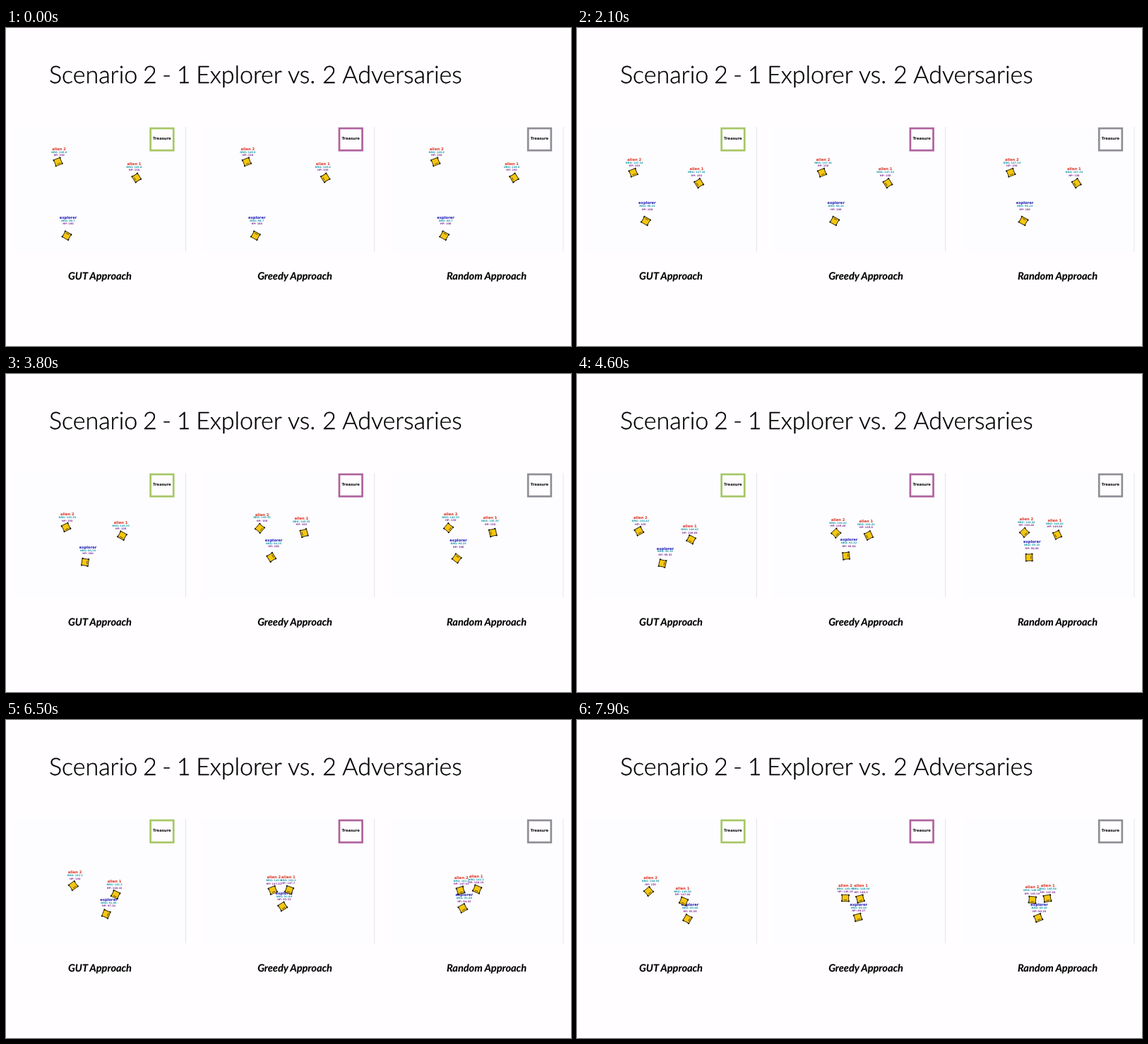
Recreate the animation shown at these times as an HTML page. Size 800 by 450 pixels, loop 8000 ms.

```html
<!DOCTYPE html>
<html lang="en">
<head>
<meta charset="utf-8">
<title>Scenario 2</title>
<style>
  html, body { margin: 0; width: 100%; height: 100%; overflow: hidden; background: #fffdff; }
  svg { display: block; width: 800px; height: 450px; }
  text { text-rendering: geometricPrecision; }
  .title { font: 300 34px Lato, Carlito, sans-serif; word-spacing: 0.5px; fill: #000; stroke: #000; stroke-width: 0.35px; }
  .tight { word-spacing: -1.5px; }
  .caption { font: italic 700 14.5px Lato, Carlito, sans-serif; text-anchor: middle; fill: #000; stroke: #000; stroke-width: 0.15px; }
  .tag, .treasure { font: 700 5.2px "DejaVu Sans", sans-serif; text-anchor: middle; }
  .alien { fill: #dc2c1c; }
  .explorer { fill: #1818b4; }
  .stat { font-size: 3.5px; }
  .energy { fill: #159aaa; }
  .health { fill: #83349a; }
</style>
</head>
<body>
<svg id="stage" viewBox="0 0 800 450" xmlns="http://www.w3.org/2000/svg">
  <defs>
    <g id="robot">
      <rect x="-4.7" y="-4.7" width="9.4" height="9.4" fill="#f6c70f" stroke="#2a2208" stroke-width="0.9"/>
      <path d="M-5.4-5h2.3M-5.4 5h2.3M3.1-5h2.3M3.1 5h2.3" stroke="#151208" stroke-width="1.6"/>
      <path d="M2.6-2.6V2.2" stroke="#6b5410"/>
    </g>
  </defs>
  <text class="title" x="61" y="78.2"><tspan class="tight">Scenario 2 - 1 </tspan>Explorer vs. 2 Adversaries</text>
</svg>
<script>
const LOOP = 8, STEP = 0.1, PITCH = 267.3;
const MEET = 2.9, END = 7.9, FIRST_HIT = 4.2;

// Every panel opens with the same straight run to the meeting point.
const roles = {
  alien2: { label: "alien 2", style: "alien", from: [73.6, 189.4], meet: [82, 210.5], energy: 149.8, health: 150 },
  explorer: { label: "explorer", style: "explorer", from: [86, 293.8], meet: [101.8, 265.2], energy: 98.7, health: 100 },
  alien1: { label: "alien 1", style: "alien", from: [184.8, 212], meet: [168, 222.5], energy: 149.8, health: 150 }
};

// After it each robot follows one curve: bend and end point, and health lost per second.
const panels = [
  {
    name: "GUT Approach", captionX: 133, color: "#a6c765",
    alien2: { bend: [90, 228.7], end: [101.5, 242.5], harm: 0 },
    explorer: { bend: [130.5, 267.3], end: [156.5, 281.5], harm: 1.2 },
    alien1: { bend: [158, 239.7], end: [151, 256.5], harm: 0.8 }
  },
  {
    name: "Greedy Approach", captionX: 409, color: "#b0629f",
    alien2: { bend: [113, 232.4], end: [112.7, 252], harm: 1.3 },
    explorer: { bend: [121, 244], end: [130.4, 279.3], harm: 2.9 },
    alien1: { bend: [127, 228], end: [133.7, 253], harm: 1 }
  },
  {
    name: "Random Approach", captionX: 680.5, color: "#8f8e96",
    alien2: { bend: [112.5, 230], end: [110.2, 254.5], harm: 1.3 },
    explorer: { bend: [106, 249], end: [118.5, 280], harm: 2.6 },
    alien1: { bend: [127, 226], end: [131.4, 252.5], harm: 0.8 }
  }
];

const stage = document.getElementById("stage");

function add(parent, tag, attrs, text) {
  const node = document.createElementNS("http://www.w3.org/2000/svg", tag);
  for (const key in attrs) node.setAttribute(key, attrs[key]);
  if (text) node.textContent = text;
  parent.appendChild(node);
  return node;
}

function makeActor(role, track, labels, bodies) {
  const tag = add(labels, "g", { class: "tag" });
  add(tag, "text", { y: 1.9, class: role.style }, role.label);
  return {
    ...role, ...track, tag,
    energyText: add(tag, "text", { y: 5.9, class: "stat energy" }),
    healthText: add(tag, "text", { y: 10.4, class: "stat health" }),
    body: add(bodies, "use", { href: "#robot" })
  };
}

const actors = panels.flatMap((panel, i) => {
  const g = add(stage, "g", { transform: `translate(${i * PITCH} 0)` });
  add(g, "rect", { x: 11, y: 140, width: 243, height: 177, fill: "#fdfcfe" });
  add(g, "path", { d: "M254.4 140V316", stroke: "#e3e2e4" });
  add(g, "rect", { x: 204.6, y: 142, width: 32.6, height: 31.2, fill: "#fffdff", stroke: panel.color, "stroke-width": 2.7 });
  add(g, "text", { class: "treasure", x: 220.8, y: 158.4 }, "Treasure");
  add(stage, "text", { class: "caption", x: panel.captionX, y: 356 }, panel.name);
  const labels = add(g, "g"), bodies = add(g, "g");
  return Object.keys(roles).map(key => makeActor(roles[key], panel[key], labels, bodies));
});

const mix = (a, b, k) => a.map((v, i) => v + (b[i] - v) * k);

function place(a, t) {
  if (t < MEET) return mix(a.from, a.meet, t / MEET);
  const k = (t - MEET) / (END - MEET);
  return mix(mix(a.meet, a.bend, k), mix(a.bend, a.end, k), k);
}

// Looking a little back and ahead turns corners gradually.
function headingAt(a, t) {
  const [x0, y0] = place(a, t - 0.4), [x1, y1] = place(a, t + 0.4);
  return Math.atan2(y1 - y0, x1 - x0);
}

const figure = v => String(+v.toFixed(2));

function draw(t) {
  for (const a of actors) {
    const [x, y] = place(a, t), heading = headingAt(a, t);
    // The label hangs above a point just ahead of the robot's centre.
    const labelX = x + 4 * Math.cos(heading), labelY = y - 22.3 + 4 * Math.sin(heading);
    a.body.setAttribute("transform", `translate(${x} ${y}) rotate(${heading * 180 / Math.PI})`);
    a.tag.setAttribute("transform", `translate(${labelX} ${labelY})`);
    a.energyText.textContent = "NRG: " + figure(a.energy - 1.17 * t);
    a.healthText.textContent = "HP: " + figure(a.health - a.harm * Math.max(0, t - FIRST_HIT));
  }
}

const start = performance.now();
function tick() {
  const t = (performance.now() - start) / 1000 % LOOP;
  draw(Math.floor(t / STEP) * STEP);
  requestAnimationFrame(tick);
}
tick();
</script>
</body>
</html>
```
